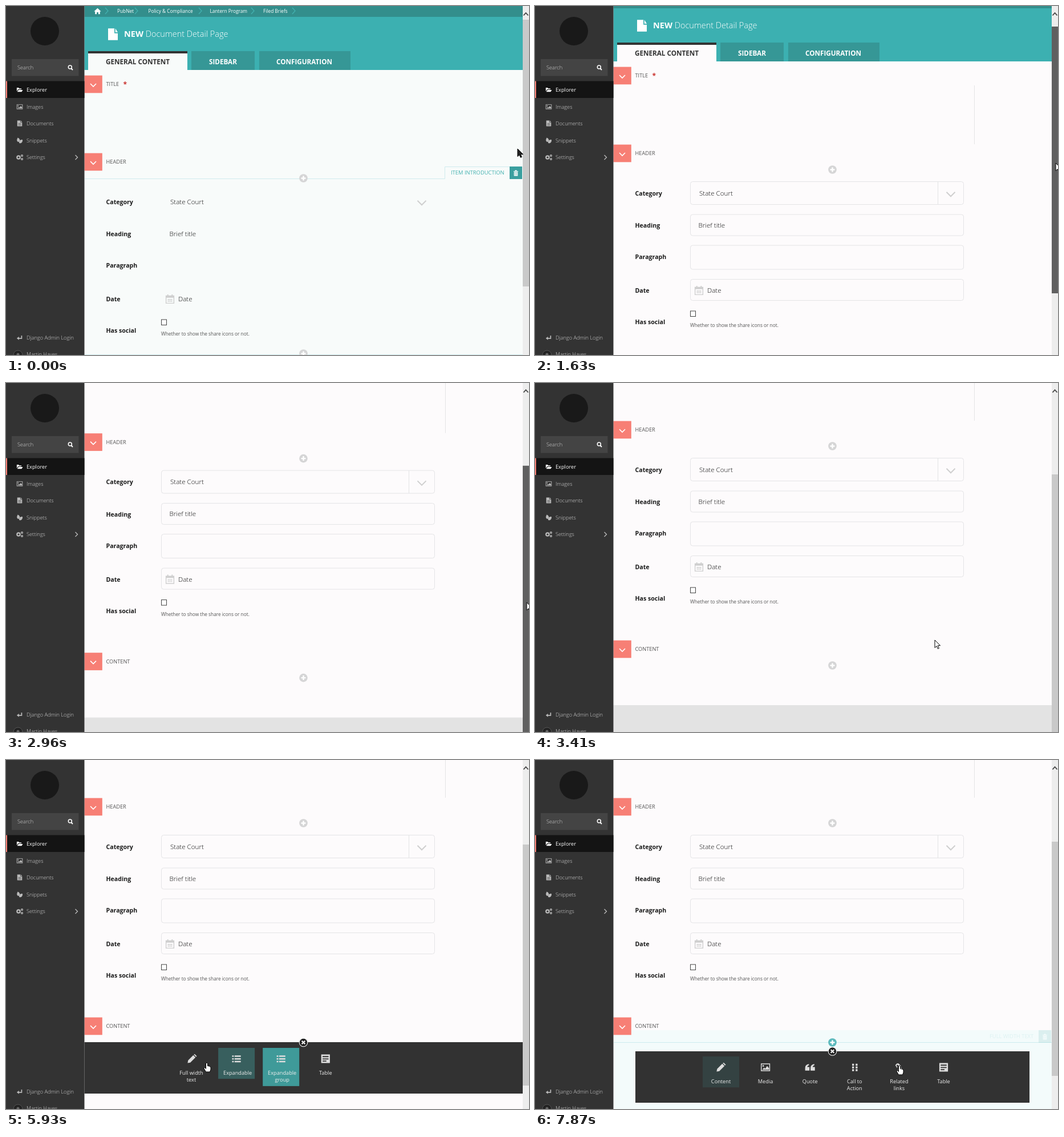
These frames come from a looping animation (917 px wide and 611 px high, 8000 ms). An HTML page:

```html
<!DOCTYPE html>
<html lang="en">
<head>
<meta charset="utf-8">
<title>Page editor</title>
<style>
html, body { margin: 0; width: 100%; height: 100%; overflow: hidden; background: #fdfbfc; }
svg { display: block; }
text { font: 300 9.2px "Open Sans", sans-serif; fill: #333; white-space: pre; }
.crumb { font-size: 8.3px; font-weight: 400; fill: #fff; }
.h1 { font-size: 14.5px; fill: #fff; }
.h1 tspan { font-weight: 700; }
.tab { font-size: 11.7px; font-weight: 700; fill: #fff; }
.on { fill: #333; }
.label { font-weight: 400; fill: #555; }
.key { font-size: 10.6px; font-weight: 700; fill: #1a1a1a; }
.value { font-size: 11.6px; fill: #111; }
.help { font-size: 8.3px; font-weight: 400; fill: #555; }
.item { font-size: 9.4px; font-weight: 400; fill: #43b1b0; }
.nav { fill: #d4d4d4; }
.nav.cur { fill: #fff; font-weight: 400; }
.choice { font-weight: 400; fill: #eee; text-anchor: middle; }
.box { fill: none; stroke: #e4e4e6; }
.icon { fill-rule: evenodd; }
</style>
</head>
<body>
<svg id="stage" width="917" height="611"></svg>
<script>
const $ = id => document.getElementById(id);
const set = (id, attrs) => { for (const k in attrs) $(id).setAttribute(k, attrs[k]); };

// drawing helpers
const rect = (x, y, w, h, fill, more = '') => `<rect x="${x}" y="${y}" width="${w}" height="${h}" fill="${fill}" ${more}/>`;
const text = (x, y, cls, s) => `<text x="${x}" y="${y}" class="${cls}">${s}</text>`;
const line = (d, color, w = 1) => `<path d="${d}" fill="none" stroke="${color}" stroke-width="${w}"/>`;
const icon = (name, x, y, size = 1, fill = '#ddd') =>
  `<path class="icon" d="${icons[name]}" fill="${fill}" transform="translate(${x} ${y}) scale(${size})"/>`;
const down = (x, y, r, color, w) => line(`M${x - r} ${y - r / 2}l${r} ${r} ${r} ${-r}`, color, w);
const field = (y, h) => rect(272.5, y + .5, 479, h, 'none', 'class="box" rx="4"');
const plus = (id, y) => `<g transform="translate(521.5 ${y})"><g id="${id}">
  <circle r="7.3" fill="#d5d5d6"/><path d="M-4 0H4M0-4V4" stroke="#fff" stroke-width="2.4"/></g></g>`;
const trash = y => rect(883, y, 22, 22, '#3a9f9f') + icon('trash', 894, y + 11.5, 1, '#fff');
const section = (y, name) => rect(137.5, y - .4, 31.3, 30.7, '#f77f75') + down(153, y + 16.5, 5, '#fff', 1.6) + text(175.5, y + 18, 'label', name);

const icons = {
  pencil: 'M-8 8l1-5L2.5-6.5l4 4L-3 7zM3.5-7.5l1.5-1.2 4 4L7.5-3.5z',
  list: [-6, -1, 4].map(y => `M-8 ${y}h3v2.6h-3zM-3.5 ${y}h11.5v2.6h-11.5z`).join(''),
  table: 'M-8-8H8V8H-8zM-5.5-5v2h11v-2zM-5.5-.5v1.7h11v-1.7zM-5.5 3.5v1.7h7v-1.7z',
  picture: 'M-8.5-7h17V7h-17zM-7-5.5v11H7v-11zM-6 4.5l3.5-4 2 2L3-2.5l3.5 4v3zM-5.5-4h2.6v2.6h-2.6z',
  quote: [-9, 1].map(x => `M${x} 1q0-6 7-7v2q-3 1-3 3.5h4v6.5h-8z`).join(''),
  grip: [-6.5, -1.5, 3.5].map(y => `M-4.5 ${y}h3.5v3.5h-3.5zM2 ${y}h3.5v3.5h-3.5z`).join(''),
  link: 'M-7-4l3-3h3l4 4v3l-2 2-2-2 1-2-3-3-2 2 2 2-1 2zM-1 1l2-2 6 5v3l-2 2h-3l-4-4z',
  trash: 'M-4-3.5h2.5v-1.5h3v1.5H4v1.2H-4zM-3.3-1.6h6.6v6.6h-6.6zM-1.7-.5v4.3h.8v-4.3zM.9-.5v4.3h.8v-4.3z',
  doc: 'M-5-6H1.5V-1H5V6H-5zM2.5-6L5-2H2.5z',
  lines: 'M-5-6H1.5V-2H5V6H-5zM2.5-6L5-3H2.5zM-3 0v1h6v-1zM-3 2.5v1h6v-1z',
  folder: 'M-6-4h4l1 1.5h4.5V-.5h-7l-2.5 4zM-2.5 .5h9l-2.5 4h-9z',
  leaf: 'M-4-6q5 2 4 6-1 3-3 3-5-2-1-9zM-1 5q-1-5 2-6 3-1 5-.5 0 6-4 7-2 .5-3-.5z',
  back: 'M5-4V2.5H-1.5V5L-6 1.5-1.5-2V.5H3V-4z',
  home: 'M0-6L6.5 0H4.5V5H1.5V1.5h-3V5h-3V0h-2z',
  date: 'M-8-6.5h3v-2h2v2h6v-2h2v2h3V8.5H-8zM-6.5-2.5v9.5h13v-9.5zM-4 0h2v2h-2zM-1 0h2v2h-2zM2 0h2v2h-2zM-4 3h2v2h-2zM-1 3h2v2h-2zM2 3h2v2h-2z'
};

// each choice: icon, label lines, label centre offset, id of its highlight
const choices = (items, y) => items.map(([name, label, dx = 0, id], i) => {
  const x = 326 + i * 78.1, rows = label.split('|');
  return (id ? rect(x - 32, y, 64, 41.5 + rows.length * 12.7, '#43b1b0', `id="${id}" opacity="0"`) : '')
    + icon(name, x, y + 19, .95) + rows.map((s, k) => text(x + dx, y + 46.5 + k * 12.5, 'choice', s)).join('');
}).join('');

const page = `
  <g id="hoverTop">${rect(137.5, 0, 768.5, 760, '#f8fbfa')}
    ${line('M138 302.5H769.5V281.5H883M138 610.5H906', '#cfebed')}
    ${text(780, 295, 'item', 'ITEM INTRODUCTION')}${trash(281)}${plus('lower', 608.5)}</g>
  ${rect(137.5, 0, 768.5, 19, '#338e8c')}${rect(137.5, 19, 768.5, 93, '#3cb0b1')}
  ${icon('home', 160.5, 9.5, .95, '#fff')}
  ${[177, 229, 341, 433, 505].map(x => line(`M${x - 3} 3l5 5.5-5 5.5`, '#43b1b0', 1.3)).join('')}
  ${text(195, 11.5, 'crumb', 'PubNet')}${text(249.5, 11.5, 'crumb', 'Policy &amp; Compliance')}
  ${text(357.5, 11.5, 'crumb', 'Lantern Program')}${text(451, 11.5, 'crumb', 'Filed Briefs')}
  ${icon('doc', 187.5, 49.5, 1.7, '#fff')}
  <text x="207" y="53.5" class="h1"><tspan>NEW</tspan> Document Detail Page</text>
  <rect id="tab" x="144" y="79" width="174" height="33"/>${rect(144, 79, 174, 4, '#333')}
  ${rect(325, 79, 111, 33, '#369796')}${rect(444, 79, 160, 33, '#369796')}
  ${text(175, 101.5, 'tab on', 'GENERAL CONTENT')}${text(356, 101.5, 'tab', 'SIDEBAR')}${text(474, 101.5, 'tab', 'CONFIGURATION')}
  ${section(122, 'TITLE')}<text x="205.5" y="142" style="font-size:12px;font-weight:700;fill:#c9302c">*</text>
  ${section(258, 'HEADER')}${plus('upper', 301.5)}
  <g id="fields">${field(322, 40)}${field(379.5, 37)}${field(433.5, 42)}${field(493, 37)}
    ${line('M706.5 322.5v40M770.5 154v103', '#e4e4e6')}</g>
  ${[['Category', 346.5], ['Heading', 403], ['Paragraph', 458], ['Date', 517], ['Has social', 572]].map(([s, y]) => text(175.5, y, 'key', s)).join('')}
  ${text(288, 346.5, 'value', 'State Court')}${text(286.5, 402.5, 'value', 'Brief title')}${text(302, 517, 'value', 'Date')}
  ${down(729, 344.5, 7.5, '#cfcfcf', 2)}${icon('date', 287.5, 513, .95, '#cfcfcf')}
  ${rect(272.5, 549, 9, 9.5, '#fff', 'stroke="#444"')}${text(272, 577, 'help', 'Whether to show the share icons or not.')}
  <rect id="footer" x="137.5" width="768.5" height="400" fill="#e3e3e3"/>
  <g id="hoverBlock">${rect(137.5, 664, 768.5, 300, '#f3fbfb')}${line('M138 685.5H906', '#cdecee')}
    <g opacity=".12">${text(797, 678, 'item', 'FULL WIDTH TEXT')}${trash(664)}</g></g>
  ${section(642, 'CONTENT')}
  <svg id="menu1" y="685" width="917">${rect(137.5, 0, 768.5, 90, '#323232')}
    ${choices([['pencil', 'Full width|text', -1, 'full'], ['list', 'Expandable', 2, 'single'], ['list', 'Expandable|group', 2, 'group'], ['table', 'Table']], 10)}</svg>
  <svg id="menu2" y="701" width="917">${rect(176, 0, 691, 90, '#323232')}
    ${choices([['pencil', 'Content', 0, 'content'], ['picture', 'Media'], ['quote', 'Quote'], ['grip', 'Call to|Action'], ['link', 'Related|links'], ['table', 'Table']], 9)}</svg>
  ${plus('add1', 685.5)}${plus('add2', 701)}`;

const nav = [['folder', 'Explorer', 149.5], ['picture', 'Images', 179.5], ['lines', 'Documents', 208.5], ['leaf', 'Snippets', 238.5], ['', 'Settings', 267.5], ['back', 'Django Admin Login', 583.5]];
const side = `${rect(0, 0, 137.5, 611, '#333')}<circle cx="68" cy="44" r="25" fill="#191919"/>
  ${rect(10, 93, 117.5, 29.5, '#444')}${text(20, 111, 'nav', 'Search')}
  <circle cx="112.3" cy="107" r="3" fill="none" stroke="#fff" stroke-width="1.5"/>${line('M114.5 109.5l2.5 2.5', '#fff', 1.8)}
  ${rect(0, 131.5, 137.5, 29.5, '#141414')}${rect(0, 131.5, 2, 29.5, '#f77f75')}
  ${nav.map(([name, s, y], i) => (name ? icon(name, 24, y - 3, name == 'picture' ? .62 : .85, i ? '#bbb' : '#fff') : '') + text(36, y, i ? 'nav' : 'nav cur', s)).join('')}
  <g fill="none" stroke="#bbb"><circle cx="22" cy="265" r="2.7" stroke-width="2.2"/>
    <circle cx="28" cy="262" r="1.4" stroke-width="1.3"/><circle cx="28" cy="268" r="1.4" stroke-width="1.3"/></g>
  ${line('M121.5 261l4 4-4 4', '#bbb', 1.3)}
  <circle cx="21" cy="611" r="8" fill="#222" stroke="#555"/><circle cx="21" cy="610" r="2.5" fill="#666"/>${text(36, 613, 'nav', 'Martin Hayes')}`;

$('stage').innerHTML = `<rect id="paper" width="917" height="611"/><g id="page">${page}</g>${side}
  ${rect(906, 0, 11, 611, '#ededed')}<rect id="thumb" x="906" width="11"/>
  ${line('M907.5 16.5l4-4.5 4 4.5', '#444', 1.8)}
  <g id="mouse" stroke="#000" stroke-linejoin="round">
    <path id="arrow" d="M0 0V13.5L3.2 10.6 5.3 15.3 7.4 14.4 5.3 9.7H9.5Z"/>
    <path id="hand" fill="#fff" d="M-1.5 1Q0-1 1.5 1V5.5Q6 5.5 7 8V12L5.5 16H-1.5L-5 10Q-5 8-3.5 8.5L-1.5 10.5Z"/></g>`;

// linear interpolation over [step, value] pairs
function at(n, keys) {
  const i = keys.findIndex(k => k[0] > n);
  if (i < 0) return keys[keys.length - 1][1];
  if (!i) return keys[0][1];
  const [a, u] = keys[i - 1], [b, v] = keys[i];
  return u + (v - u) * (n - a) / (b - a);
}

const path = [[0, 897, 250], [1, 903, 251], [2, 909, 253], [5, 912, 254], [7, 913, 255], [11, 913, 275], [16, 913, 341], [21, 913, 395],
  [22, 810, 425], [23, 701, 450], [24, 630, 468], [26, 545, 489], [29, 518, 493], [35, 518, 493], [37, 505, 518], [39, 482, 533],
  [40, 352, 530], [41, 340, 534], [42, 328, 537], [51, 328, 537], [52, 400, 537], [53, 639, 535]];
const pathX = path.map(([n, x]) => [n, x]), pathY = path.map(([n, , y]) => [n, y]);

function button(id, color, angle, ring) {
  set(id, { transform: `rotate(${angle})` });
  const [disc, sign] = $(id).children;
  disc.setAttribute('fill', color);
  disc.setAttribute('stroke', ring ? '#fff' : 'none');
  sign.setAttribute('stroke-width', ring ? 2 : 2.4);
}

function draw() {
  const n = Math.min(53, Math.floor((performance.now() % 8000 + 14) / 148.3));
  const early = n < 7, paper = early ? '#f8fbfa' : '#fdfbfc';
  const scroll = at(n, [[9, 0], [11, 15], [14, 52], [16, 83], [21, 191]]);
  const h1 = at(n, [[32, 0], [34, 90], [44, 90], [46, 0]]);
  const h2 = at(n, [[45, 0], [48, 90]]);

  set('paper', { fill: paper });
  set('tab', { fill: paper });
  set('page', { transform: `translate(0 ${-scroll})` });
  set('hoverTop', { opacity: +early });
  set('fields', { opacity: +!early });
  set('footer', { y: 755 + h1 + h2 * 1.4 });
  set('menu1', { height: h1 });
  set('menu2', { height: h2 });
  set('hoverBlock', { opacity: at(n, [[51, 0], [53, 1]]) });
  set('full', { opacity: at(n, [[40, 0], [43, 1]]) });
  set('single', { opacity: at(n, [[39, 0], [40, .35], [42, 0]]) });
  set('group', { opacity: at(n, [[36, 0], [38, 1], [39, 1], [40, .82], [42, .1], [43, 0]]) });
  set('content', { opacity: at(n, [[47, 0], [49, 1], [51, 1], [52, .5], [53, .12]]) });

  const open = n > 32 && n < 46;
  button('add1', open ? '#222' : n > 51 ? '#5bb9bc' : n > 29 && n < 33 ? '#35a9a9' : '#d5d5d6', open ? 45 : n == 32 ? 30 : 0, open);
  button('add2', '#222', 45, true);
  set('add2', { opacity: +(h2 > 0) });

  const top = at(n, [[7, 24], [9, 25], [11, 36], [16, 84], [21, 160], [32, 160], [34, 148], [44, 148], [48, 143]]);
  const size = at(n, [[32, 467], [34, 422], [44, 422], [48, 410]]);
  set('thumb', { y: top, height: size, fill: n > 6 && n < 22 ? '#606060' : '#c9c9c9' });

  const hand = n > 36;
  set('mouse', { transform: `translate(${at(n, pathX)} ${at(n, pathY)})` });
  set('arrow', { opacity: +!hand, fill: early ? '#222' : '#fff' });
  set('hand', { opacity: +hand });
  requestAnimationFrame(draw);
}
draw();
</script>
</body>
</html>
```
